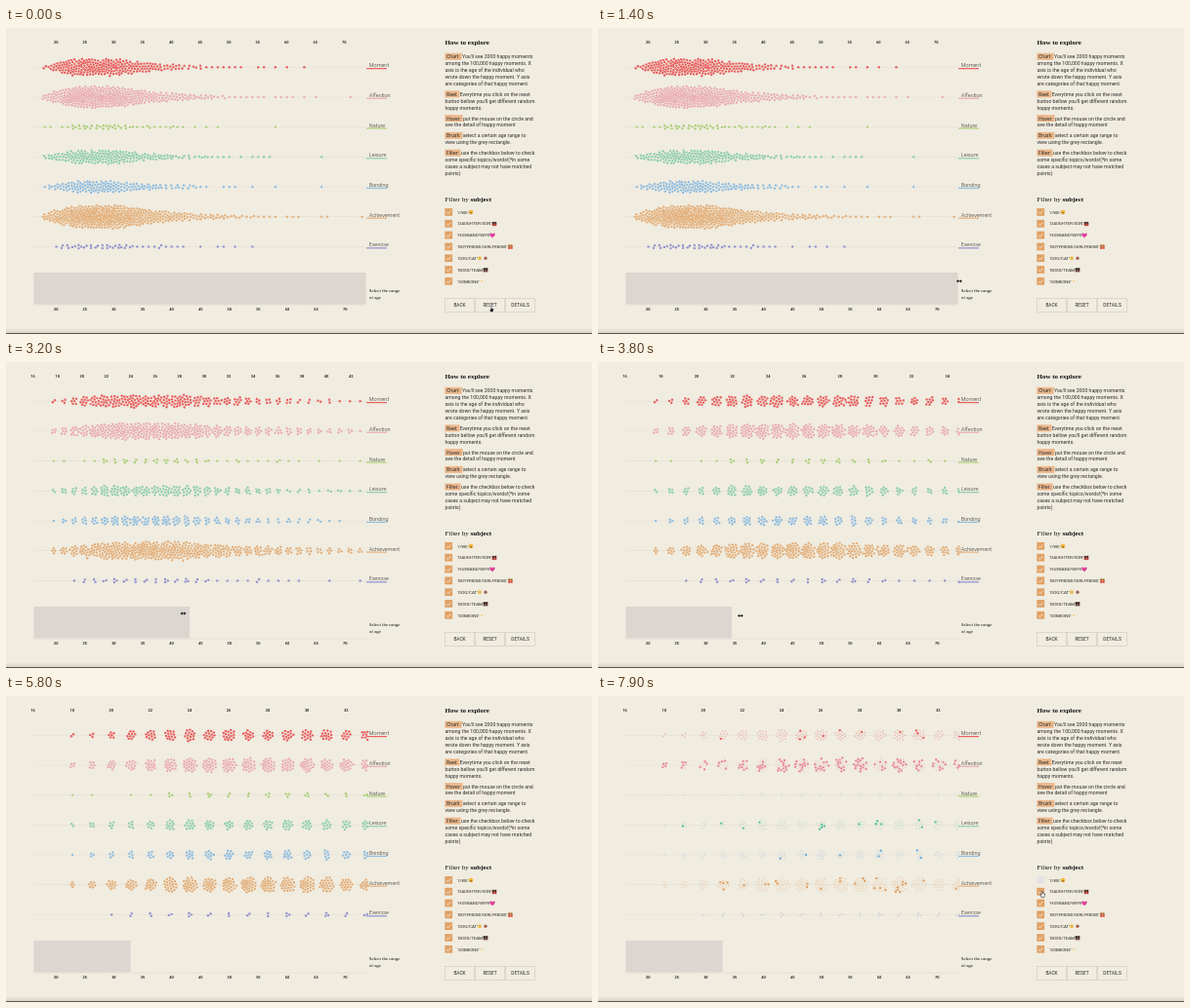
Recreate the animation shown at these times as an HTML page with a canvas. Size 600 by 314 pixels, loop 8 s.

```html
<!DOCTYPE html>
<html lang="en">
<head>
<meta charset="utf-8">
<title>Happy moments</title>
<style>
html, body { margin: 0; width: 100%; height: 100%; overflow: hidden; background: #f0ece0; }
svg, canvas { position: absolute; left: 0; top: 0; width: 600px; height: 314px; display: block; }
text { font-family: Roboto, Arial, sans-serif; fill: #2c2a28; white-space: pre; }
.serif { font-family: "Liberation Serif", "Times New Roman", serif; fill: #111; }
.b { font-weight: 700; }
</style>
</head>
<body>
<svg id="page" viewBox="0 0 600 314"></svg>
<canvas id="stage"></canvas>
<script>
const LOOP = 8000, STEP = 100;
const LEFT = 28, WIDE = 340.5, YEAR = 5.92, AGE0 = 16;
const UNCHECK = 7300;

// peak: most dots per year of age; fall: years for the count to drop to a third
const rows = [
  { name: 'Moment', color: '#e86060', peak: 15, fall: 7, last: 63, keep: .08 },
  { name: 'Affection', color: '#eaadb1', lit: '#e98d99', peak: 21, fall: 7.5, last: 71, keep: .55 },
  { name: 'Nature', color: '#acd079', peak: 2.4, fall: 12, last: 58, keep: 0 },
  { name: 'Leisure', color: '#90cfae', lit: '#5fc3a4', peak: 11, fall: 7.5, last: 66, keep: .08 },
  { name: 'Bonding', color: '#90bde0', lit: '#6aaee0', peak: 9, fall: 7.5, last: 66, keep: .1 },
  { name: 'Achievement', color: '#e3b07c', lit: '#e0a060', peak: 26, fall: 8, last: 73, keep: .1 },
  { name: 'Exercise', color: '#9292cf', peak: 2.2, fall: 10, last: 54, keep: .06 }
];
rows.forEach((row, i) => row.y = 40.2 + i * 30.7);

// [time, x, y]
const brushKeys = [[0, 368.5], [1800, 368.5], [2400, 294.5], [3200, 188], [4100, 127.6]];
const mouseKeys = [
  [400, 497, 288], [900, 371, 260], [1800, 369, 259.5], [2400, 284, 260], [3200, 181.5, 258],
  [4100, 128, 261.5], [4600, 128, 261.5], [5600, 612, 250], [6000, 612, 250],
  [7100, 454, 190], [7500, 454, 190], [7900, 455, 203]
];

function track(keys, t, c) {
  for (let i = 1; i < keys.length; i++) {
    const a = keys[i - 1], b = keys[i];
    if (t <= b[0]) return a[c] + (b[c] - a[c]) * Math.max(0, t - a[0]) / (b[0] - a[0]);
  }
  return keys[keys.length - 1][c];
}

// the brush slows down while it closes in on its last place
function brushX(t) {
  if (t < 3200) return track(brushKeys, t, 1);
  const u = Math.min(1, (t - 3200) / 900);
  return 127.6 + 60.4 * (1 - u) ** 1.7;
}

let seed = 20231;
function rnd() {
  seed = (seed * 1664525 + 1013904223) % 4294967296;
  return seed / 4294967296;
}

// ---- dots: a soft beeswarm, worked out once for the whole loop ----
const DOT = 1.2, REACH = 4;
const zoom = t => WIDE * YEAR / (brushX(t) - LEFT + 1);
const place = (age, scale) => LEFT + (age - AGE0) * scale;

function makeDots(row, scale) {
  const dots = [];
  for (let age = 18; age <= row.last; age++) {
    const rise = Math.min(1, (age - 17) / 7);
    const drop = Math.exp(-Math.max(0, age - 30) / row.fall);
    const n = row.peak * rise * drop * (.85 + .3 * rnd());
    const count = age === row.last ? 1 : Math.floor(n + rnd());
    for (let i = 0; i < count; i++) {
      dots.push({ age, r: 1.35 + rnd() * .45, path: [], keep: rnd() < row.keep,
                  x: place(age, scale) + (rnd() - .5) * Math.min(16, n),
                  y: (rnd() - .5) * Math.min(16, n) });
    }
  }
  return dots;
}

function relax(dots, scale) {
  for (const d of dots) {
    d.x += (place(d.age, scale) - d.x) * .035;
    d.y -= d.y * .035;
  }
  dots.sort((a, b) => a.x - b.x);
  for (let i = 0; i < dots.length; i++) {
    const a = dots[i];
    for (let j = i + 1; j < dots.length; j++) {
      const b = dots[j], dx = b.x - a.x;
      if (dx > REACH) break;
      const dy = b.y - a.y, r = Math.hypot(dx, dy) || .01, gap = a.r + b.r;
      if (r >= gap) continue;
      const push = (gap - r) / r * .4;
      a.x -= dx * push; a.y -= dy * push;
      b.x += dx * push; b.y += dy * push;
    }
  }
}

for (const row of rows) {
  let scale = zoom(0);
  const dots = row.dots = makeDots(row, scale);
  for (let i = 0; i < 120; i++) relax(dots, scale);
  for (let t = 0; t < LOOP; t += STEP) {
    const next = scale + (zoom(t) - scale) * .25;
    for (const d of dots) d.x += (d.age - AGE0) * (next - scale);
    scale = next;
    if (t > 1800 && t < 6800) for (let i = 0; i < 7; i++) relax(dots, scale);
    for (const d of dots) d.path.push(d.x, d.y);
  }
}

// ---- fixed page ----
const page = document.getElementById('page');
function node(tag, attrs, text) {
  const el = document.createElementNS('http://www.w3.org/2000/svg', tag);
  for (const k in attrs) el.setAttribute(k, attrs[k]);
  if (text) el.textContent = text;
  page.appendChild(el);
  return el;
}
const label = (x, y, size, text, more) => node('text', { x, y, 'font-size': size, ...more }, text);
const box = (x, y, width, height, fill, more) => node('rect', { x, y, width, height, fill, ...more });

for (const r of rows) {
  box(LEFT, r.y - .3, 341, .6, '#e4e0d6');
  box(369, r.y + .8, 21, 1.2, r.color);
  label(371.8, r.y, 5.5, r.name, { 'font-weight': 300 });
}
box(LEFT, 283.8, 341, .5, '#d8d4ca');
for (let a = 20; a <= 70; a += 5) {
  label(place(a, YEAR) - .5, 289.9, 3.9, String(a), { 'text-anchor': 'middle', class: 'b' });
}
label(371.8, 271, 4.95, 'Select the range', { class: 'serif' });
label(371.8, 278.2, 4.95, 'of age', { class: 'serif' });

label(449.5, 17.2, 7, 'How to explore', { class: 'serif b' });
const help = [
  ['Chart:', "You'll see 2000 happy moments", 'among the 100,000 happy moments. X',
    'axis is the age of the individual who', 'wrote down the happy moment. Y axis',
    'are categories of that happy moment.'],
  ['Reet:', 'Everytime you click on the reset',
    "button bellow you'll get different random", 'happy moments.'],
  ['Hover:', 'put the mouse on the circle and', 'see the detail of happy moment'],
  ['Brush:', 'select a certain age range to', 'view using the grey rectangle.'],
  ['Filter:', 'use the checkbox below to check', 'some specific topics/words!(*in some',
    'cases a subject may not have matched', 'points)']
];
let helpY = 31.2;
for (const [head, first, ...rest] of help) {
  const back = box(449.3, helpY - 5.4, 0, 7, '#ebb88c');
  const w = label(451, helpY, 5.15, head).getComputedTextLength() + 3.6;
  back.setAttribute('width', w);
  label(449.6 + w, helpY, 5.15, first);
  for (const line of rest) label(449.5, helpY += 6.95, 5.15, line);
  helpY += 10.8;
}

const title = label(449.5, 178, 7.1, 'Filter by ', { class: 'serif' });
const strong = document.createElementNS('http://www.w3.org/2000/svg', 'tspan');
strong.setAttribute('class', 'b');
strong.textContent = 'subject';
title.appendChild(strong);

const subjects = ['I/WE', 'DAUGHTER/SON', 'HUSBAND/WIFE', 'BOYFRIEND/GIRLFRIEND', 'DOG/CAT', 'BOSS/TEAM', 'SOMEONE'];
const checkY = i => 189 + i * 11.82;
subjects.forEach((s, i) => label(462.6, checkY(i) + 1.6, 4.4, "'" + s + "'"));

['BACK', 'RESET', 'DETAILS'].forEach((s, i) => {
  const x = 449.5 + i * 31;
  box(x, 277.5, 30, 14, 'none', { stroke: '#d3cec2', 'stroke-width': .7 });
  label(x + 15, 286.2, 4.8, s, { 'text-anchor': 'middle', fill: '#444' });
});

// small picture signs after the subjects
const pip = (cx, cy, r, fill) => node('circle', { cx, cy, r, fill });
function pair(x, y, hair, body) {
  for (const dx of [-1.2, 1.2]) {
    box(x + dx - 1.1, y, 2.2, 2.3, body);
    pip(x + dx, y - .9, 1.2, hair);
  }
}
pip(476, checkY(0), 2.3, '#f3b83a');
box(474.8, checkY(0) + .4, 2.4, .9, '#7c4a20');
pair(500, checkY(1), '#4d2c22', '#b5413a');
node('path', { d: 'M498 215.2C493.6 212 495.4 209 498 211.2C500.6 209 502.4 212 498 215.2Z', fill: '#e0409a' });
pair(516.4, checkY(3), '#b06a2c', '#d8483c');
pip(485, checkY(4), 2, '#e9bd52');
pip(491, checkY(4), 1.7, '#a0655a');
pair(491, checkY(5), '#3a2a26', '#6b4038');
pip(487, checkY(6), .9, '#ecc76b');

for (let y = 308; y < 313; y++) box(0, y, 600, 1, '#6b6150', { opacity: (y - 307) * .03 });
box(0, 313, 600, 1, '#5c564e');

// ---- moving parts ----
const cv = document.getElementById('stage'), g = cv.getContext('2d');
const dpr = window.devicePixelRatio || 1;
cv.width = 600 * dpr;
cv.height = 314 * dpr;

function drawAxis(t) {
  const scale = zoom(t), span = WIDE / scale, step = span > 31.6 ? 5 : 2;
  g.font = '700 3.9px Roboto, Arial, sans-serif';
  g.textAlign = 'center';
  g.fillStyle = '#2c2a28';
  for (let a = Math.ceil(AGE0 / step) * step; a <= AGE0 + span; a += step) {
    g.fillText(a, place(a, scale) - .4, 16.4);
  }
}

function drawDots(t) {
  const k = Math.floor(t / STEP) * 2;
  const fade = Math.min(1, Math.max(0, (t - UNCHECK) / 300));
  for (const row of rows) {
    for (const d of row.dots) {
      const x = d.path[k];
      if (x > 370.5) continue;
      const dim = d.keep ? 0 : fade;
      g.globalAlpha = 1 - .65 * dim;
      g.fillStyle = d.keep && fade ? row.lit || row.color : row.color;
      g.beginPath();
      g.arc(x, row.y + d.path[k + 1], DOT - .35 * dim, 0, 7);
      g.fill();
    }
  }
  g.globalAlpha = 1;
}

function drawChecks(t) {
  for (let i = 0; i < subjects.length; i++) {
    const y = checkY(i), on = i > 0 || t < UNCHECK;
    g.fillStyle = on ? '#e0a165' : '#e5e3e1';
    g.fillRect(449.3, y - 4, 7.8, 7.8);
    if (!on) continue;
    g.strokeStyle = '#fbf3e8';
    g.lineWidth = .8;
    g.beginPath();
    g.moveTo(451, y + .1);
    g.lineTo(452.6, y + 1.7);
    g.lineTo(455.5, y - 1.5);
    g.stroke();
  }
}

function shape(points) {
  g.beginPath();
  points.forEach(([x, y]) => g.lineTo(x, y));
  g.closePath();
  g.fill();
}

const hand = [[-.9, -2.6], [.2, -2.6], [.4, -.5], [2.6, 0], [1.7, 3.6], [-.8, 3.6], [-2.4, .8], [-.8, 1]];
const arrow = [[0, -3], [0, 3], [1.4, 1.8], [2.4, 3.8], [3.2, 3.4], [2.3, 1.5], [4.1, 1.4]];

function drawMouse(t) {
  g.save();
  g.translate(track(mouseKeys, t, 1), track(mouseKeys, t, 2));
  g.fillStyle = '#111';
  g.strokeStyle = '#fff';
  g.lineWidth = .6;
  if (t >= 900 && t <= 4600) {
    g.fillRect(-1.6, -.45, 3.2, .9);
    for (const side of [-1, 1]) shape([[2.9 * side, 0], [side, -1.7], [side, 1.7]]);
  } else {
    if (t >= 7000) {
      g.fillStyle = '#fff';
      g.strokeStyle = '#222';
    }
    shape(t < 450 || t >= 7000 ? hand : arrow);
    g.stroke();
  }
  g.restore();
}

function draw(now) {
  const t = Math.floor((now % LOOP) / STEP) * STEP;
  g.setTransform(dpr, 0, 0, dpr, 0, 0);
  g.clearRect(0, 0, 600, 314);
  g.fillStyle = '#dbd6d0';
  g.fillRect(LEFT + .4, 251, brushX(t) - LEFT - .4, 32.6);
  drawAxis(t);
  drawDots(t);
  drawChecks(t);
  drawMouse(t);
}

const start = performance.now();
function tick() {
  draw(performance.now() - start);
  requestAnimationFrame(tick);
}
tick();
</script>
</body>
</html>
```
